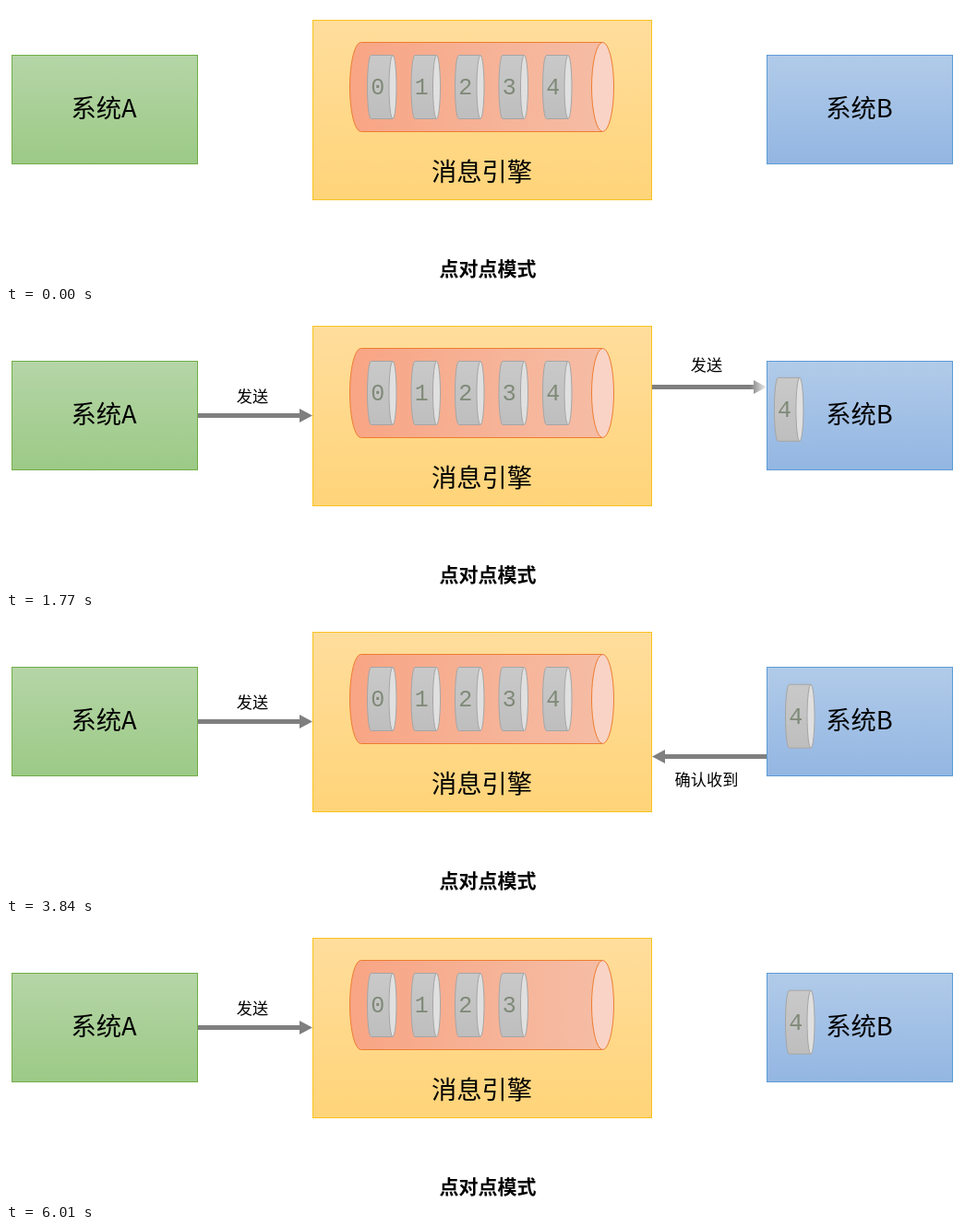
Recreate the animation shown at these times as an HTML page. Size 1039x302 px, loop 6.94 s.

```html
<!DOCTYPE html>
<html lang="zh">
<head>
<meta charset="utf-8">
<style>
  html, body { margin: 0; width: 100%; height: 100%; overflow: hidden; background: #fff; }
  svg { display: block; width: 1039px; height: 302px; }
  text { font: 27.3px "Noto Sans CJK SC", "Noto Sans CJK", sans-serif; text-anchor: middle; }
  .small { font-size: 17.2px; }
  .title { font-size: 21px; font-weight: bold; }
  .digit { font: 25px "Liberation Mono", monospace; fill: #7f8a78; }
  .arrow { fill: #7f7f7f; }
</style>
</head>
<body>
<svg viewBox="0 0 1039 302">
  <defs>
    <linearGradient id="green" x2="0" y2="1"><stop stop-color="#b5d5a7"/><stop offset="1" stop-color="#9cca86"/></linearGradient>
    <linearGradient id="amber" x2="0" y2="1"><stop stop-color="#ffdd9c"/><stop offset="1" stop-color="#ffd479"/></linearGradient>
    <linearGradient id="blue" x2="0" y2="1"><stop stop-color="#b1cbe9"/><stop offset="1" stop-color="#93b6e2"/></linearGradient>
    <linearGradient id="pipe"><stop stop-color="#f8a584"/><stop offset="1" stop-color="#f5bda5"/></linearGradient>
    <linearGradient id="grey" x2="0" y2="1"><stop stop-color="#c9c9c9"/><stop offset="1" stop-color="#bebebe"/></linearGradient>
  </defs>

  <rect x="6.5" y="53.5" width="201" height="118" fill="url(#green)" stroke="#70ad47"/>
  <rect x="332.5" y="15.5" width="367" height="195" fill="url(#amber)" stroke="#f9c21f"/>
  <rect x="824.5" y="53.5" width="201" height="118" fill="url(#blue)" stroke="#5b9bd5"/>
  <text x="106" y="121">系统A</text>
  <text x="515.5" y="190">消息引擎</text>
  <text x="924.5" y="121">系统B</text>
  <text class="title" x="522" y="292.5">点对点模式</text>

  <g stroke="#ed7d31">
    <path d="M646.5 39.5H384.5A12 48.5 0 0 0 384.5 136.5H646.5Z" fill="url(#pipe)"/>
    <ellipse cx="646.5" cy="88" rx="12" ry="48.5" fill="#f9d3c5"/>
  </g>
  <g id="discs"></g>
  <path id="cross" d="M581 68l12 12 12-12 9 9-12 12 12 12-9 9-12-12-12 12-9-9 12-12-12-12z" fill="#d9706c" stroke="#c81e1e"/>
  <g id="arrows"></g>
</svg>
<script>
const LOOP = 6940, STEP = 77.11, SOFT = 20;
const byId = id => document.getElementById(id);
const clamp = v => Math.min(1, Math.max(0, v));
const ramp = (t, start, end) => clamp((t - start) / (end - start));
const easeInOut = p => p < .5 ? 2 * p * p : 1 - 2 * (1 - p) ** 2;

const disc = (id, x, digit) => `<g id="${id}" transform="translate(${x} 53)">
  <g stroke="#a5a5a5"><path d="M28 .5H4.5A4 34.5 0 0 0 4.5 69.5H28Z" fill="url(#grey)"/>
  <ellipse cx="28" cy="35" rx="4" ry="34.5" fill="#e0e0e0"/></g>
  <text class="digit" x="11.7" y="43">${digit}</text></g>`;

byId('discs').innerHTML =
  [0, 1, 2, 3, 4].map(i => disc('disc' + i, 391 + 47.5 * i, i)).join('') + disc('sent', 581, 4);

// An arrow with its label, revealed together behind a soft edge.
const arrow = (id, from, to, y, label, labelX, labelY) => {
  const neck = to - 14 * Math.sign(to - from);
  return `<linearGradient id="${id}Edge" gradientUnits="userSpaceOnUse">
      <stop stop-color="#fff"/><stop offset="1" stop-color="#000"/></linearGradient>
    <mask id="${id}Mask" maskUnits="userSpaceOnUse" x="0" y="0" width="1039" height="302">
      <rect width="1039" height="302" fill="url(#${id}Edge)"/></mask>
    <g id="${id}" mask="url(#${id}Mask)">
      <path class="arrow" d="M${from} ${y - 2.5}H${neck}V${y - 7.5}L${to} ${y}L${neck} ${y + 7.5}V${y + 2.5}H${from}Z"/>
      <text class="small" x="${labelX}" y="${labelY}">${label}</text></g>`;
};

byId('arrows').innerHTML =
  arrow('send', 208, 332, 112.5, '发送', 267, 97.5) +
  arrow('deliver', 700, 824, 81.5, '发送', 759, 63.5) +
  arrow('confirm', 824, 700, 150.5, '确认收到', 759, 182);

const show = (id, visible) => byId(id).style.display = visible ? '' : 'none';

function wipe(id, lead, direction) {
  const edge = byId(id + 'Edge');
  edge.setAttribute('x1', lead - SOFT * direction);
  edge.setAttribute('x2', lead);
}

function draw(now) {
  const t = Math.floor((now % LOOP + 16) / STEP) * 77;

  show('send', t > 130);
  wipe('send', 207 + 147 * ramp(t, 130, 650), 1);

  const travel = ramp(t, 658, 1970), moved = easeInOut(travel);
  show('sent', travel > 0);
  byId('sent').setAttribute('transform', `translate(${581 + 263 * moved} ${53 + 18.7 * moved})`);
  show('deliver', travel > 0 && t < 2050);
  wipe('deliver', 711 + 136 * travel, 1);

  show('confirm', t > 2600 && t < 4050);
  wipe('confirm', 823 - 146 * ramp(t, 2600, 3870), -1);

  const gone = ramp(t, 5000, 6000);
  byId('cross').style.opacity = ramp(t, 4000, 5000) * (1 - gone);
  byId('disc4').style.opacity = 1 - gone;
  show('cross', t > 4010);
}

function tick(now) {
  draw(now);
  requestAnimationFrame(tick);
}
draw(0);
requestAnimationFrame(tick);
</script>
</body>
</html>
```
